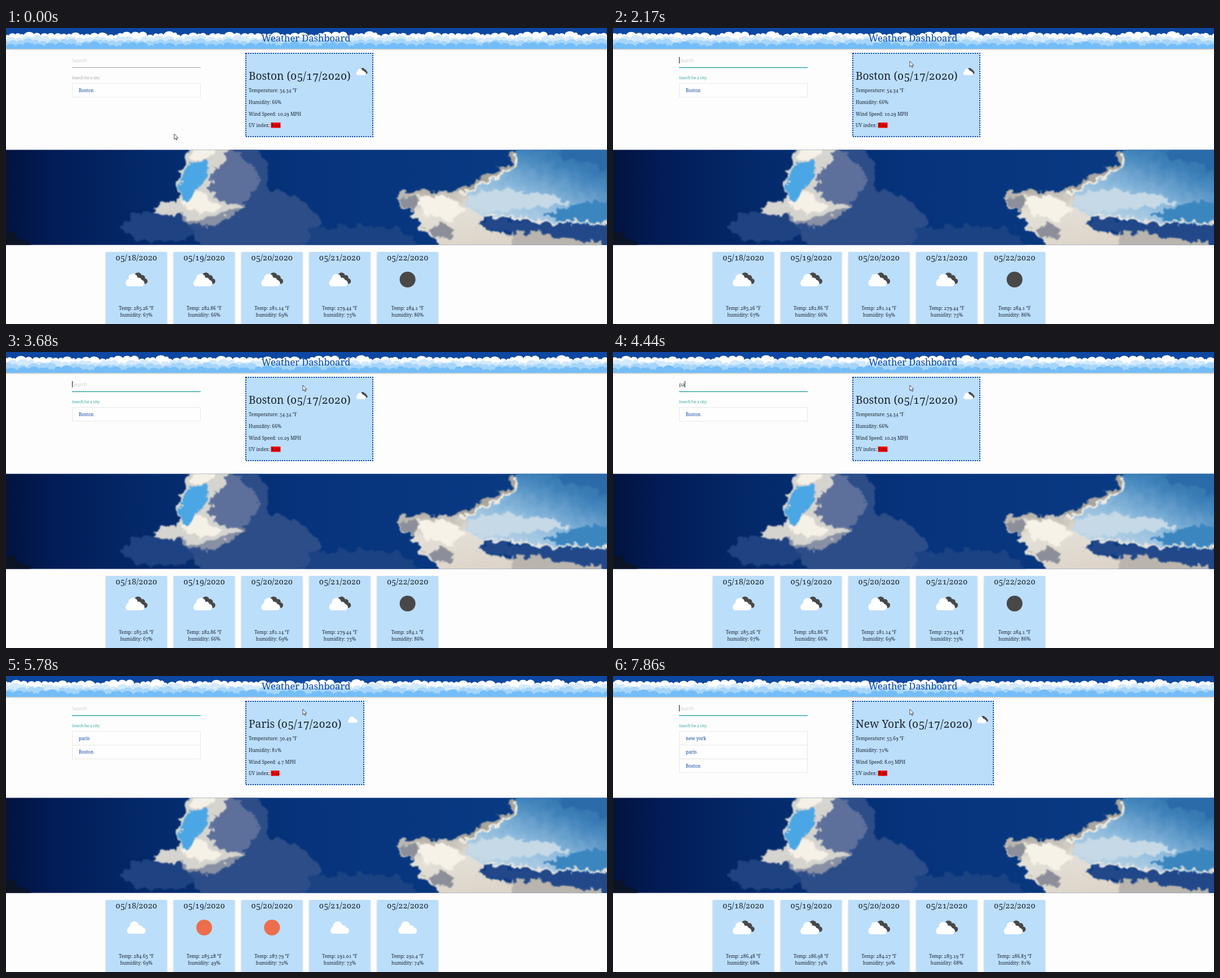
Write an HTML page that moves like this. It is 1065 px wide and 526 px high and loops after 7.99 s.

```html
<!DOCTYPE html>
<html lang="en">
<head>
<meta charset="utf-8">
<title>Weather Dashboard</title>
<style>
  html, body { margin: 0; width: 100%; height: 100%; overflow: hidden; background: #fdfdfd; }
  svg { display: block; width: 100%; height: 100%; }
  text { font-family: "Noto Serif", serif; font-variant-numeric: oldstyle-nums tabular-nums; fill: #1c2530; white-space: pre; }
  .sans { font-family: "Open Sans", sans-serif; font-variant-numeric: normal; }
  .mid { text-anchor: middle; }
  .blue { fill: #0d47a1; }
</style>
</head>
<body>
<svg viewBox="0 0 1065 526">
  <defs>
    <clipPath id="headerClip"><rect width="1065" height="37"/></clipPath>
    <clipPath id="skyClip"><rect y="216.5" width="1065" height="169"/></clipPath>
    <linearGradient id="night">
      <stop offset="0" stop-color="#02133f"/>
      <stop offset=".08" stop-color="#021c56"/>
      <stop offset=".25" stop-color="#042a6c"/>
      <stop offset=".5" stop-color="#06337c"/>
      <stop offset="1" stop-color="#0a3d85"/>
    </linearGradient>
    <linearGradient id="day" x1=".2" y1="1" x2="1" y2="0">
      <stop offset="0" stop-color="#c3d9e9"/>
      <stop offset=".35" stop-color="#8bb9dc"/>
      <stop offset=".65" stop-color="#3f82ba"/>
      <stop offset="1" stop-color="#1d5b97"/>
    </linearGradient>
    <linearGradient id="cream" x1="0" y1="0" x2=".3" y2="1">
      <stop offset="0" stop-color="#aaa69f"/>
      <stop offset=".4" stop-color="#e4e0d8"/>
      <stop offset="1" stop-color="#ddd4c8"/>
    </linearGradient>
    <filter id="ragged" filterUnits="userSpaceOnUse" x="-20" y="196" width="1105" height="210" color-interpolation-filters="sRGB">
      <feTurbulence type="fractalNoise" baseFrequency=".06" numOctaves="4" seed="8"/>
      <feDisplacementMap in="SourceGraphic" scale="24" xChannelSelector="R" yChannelSelector="G"/>
      <feGaussianBlur stdDeviation=".9"/>
    </filter>
    <filter id="shadow" x="-10%" y="-10%" width="120%" height="120%">
      <feDropShadow dx="0" dy="1" stdDeviation="1" flood-opacity=".3"/>
    </filter>
    <g id="cloud" fill="#fff">
      <rect x="-16.5" y="0" width="33" height="11" rx="5.5"/>
      <circle cx="-3.5" cy="-3" r="8"/>
      <circle cx="6.5" cy="1" r="5"/>
      <circle cx="-9.5" cy="3.5" r="6"/>
    </g>
    <g id="broken">
      <g fill="#484848">
        <circle cx="3" cy="-6.3" r="6.3"/>
        <circle cx="10.5" cy="-3" r="5"/>
        <circle cx="15" cy="3" r="4.8"/>
        <rect x="2" y="-4" width="12" height="11.5"/>
      </g>
      <use href="#cloud" x="-2.5" y="1" stroke="#bbdefb" stroke-width="1"/>
      <use href="#cloud" x="-2.5" y="1"/>
    </g>
    <circle id="sun" r="14" fill="#ec6e4c"/>
    <circle id="moon" r="14" fill="#484848"/>
  </defs>

  <rect width="1065" height="526" fill="#fdfdfd"/>
  <rect width="1065" height="37" fill="#0d47a1" filter="url(#shadow)"/>
  <g id="clouds" clip-path="url(#headerClip)"></g>
  <text class="mid blue" x="531.5" y="24" font-size="16.5">Weather Dashboard</text>

  <g clip-path="url(#skyClip)">
    <rect y="216" width="1065" height="170" fill="url(#night)"/>
    <g filter="url(#ragged)">
      <path fill="#0b1424" d="M-20 350L25 368 50 400H-20Z"/>
      <path fill="#1f4282" d="M205 355L225 330 300 322 340 360 320 378 235 378Z"/>
      <path fill="#2c4d88" d="M345 205H440L462 250 465 285 515 300 548 322 558 352 535 385 480 400H350L325 350Z"/>
      <path fill="#1b4283" d="M540 360L600 350 700 357 745 400H520Z"/>
      <path fill="#5d709b" d="M385 205L425 230 450 262 442 292 415 315 375 308 345 290 358 255Z"/>
      <path fill="#8790a4" d="M300 325L425 312 412 331 388 336 372 350 355 354 335 346 312 338Z"/>
      <path fill="#d6d4cf" d="M322 208H395L388 236 370 250 358 278 370 302 398 311 425 320 390 330 345 342 312 333 290 333 262 322 278 312 304 308 305 270 316 245Z"/>
      <path fill="#f5f1e6" d="M331 215H376L364 228 330 238Z M308 306L345 288 364 308 385 318 350 328 325 326Z"/>
      <path fill="#4aa6e4" d="M328 240L354 234 360 262 344 282 321 304 308 302 310 268Z"/>
      <path fill="url(#day)" d="M907 205H1090V348H960L905 337H825L805 305 835 280 890 255 908 224Z"/>
      <path fill="#2c6baa" d="M990 205H1090V262L1045 246 985 230Z"/>
      <path fill="#c5d9e6" d="M820 300L870 288 960 296 1000 310 930 322 850 328 815 316Z"/>
      <path fill="#3c86c0" d="M955 330L1010 314 1090 300V347H990Z"/>
      <path fill="url(#cream)" d="M810 288L768 292 740 284 715 291 685 300 700 319 722 326 716 337 736 346 735 363 760 371 775 400H950L880 364 835 352 850 335 812 318 820 300Z"/>
      <path fill="#8c8f99" d="M690 303L716 298 735 306 722 324 702 318Z M742 355L775 348 790 368 770 376Z"/>
      <path fill="#f6f2e8" d="M728 300L762 296 800 306 812 326 790 340 750 336 736 322Z"/>
      <path fill="none" stroke="#a8a59f" stroke-width="10" d="M906 220L896 244 870 258 836 274 805 292"/>
      <path fill="none" stroke="#f0ece2" stroke-width="5" d="M909 222L899 247 872 262 838 279 808 298"/>
      <path fill="#22488a" d="M835 350L860 337 905 342 960 349 1090 349V400H950L890 364Z"/>
      <path fill="none" stroke="#e8e6df" stroke-width="4" d="M845 335L905 335 960 347 1020 343 1080 348"/>
      <path fill="#b9b5ae" d="M890 368L940 362 985 376 1060 381V400H900Z"/>
    </g>
  </g>

  <g id="content"></g>
  <rect id="caret" y="51.5" width="1" height="11.5" fill="#222"/>
  <path id="pointer" d="M0 0V9.8L2.3 7.8 3.8 11.2 5.4 10.5 3.9 7.2H6.9Z" fill="#fff" stroke="#222" stroke-width=".8"/>
</svg>
<script>
const LOOP = 7990, BLINK = 530;
const $ = id => document.getElementById(id);

const cities = {
  boston: { title: 'Boston', right: 651, icon: 'broken', temp: '54.34', humidity: 66, wind: '10.29', uv: '8.82', uvWidth: 17,
    days: [['broken', '285.26', 67], ['broken', '282.86', 66], ['broken', '281.14', 69], ['broken', '279.44', 75], ['moon', '284.1', 86]] },
  paris: { title: 'Paris', right: 635, icon: 'cloud', temp: '50.49', humidity: 81, wind: '4.7', uv: '7.16', uvWidth: 14.5,
    days: [['cloud', '284.65', 69], ['sun', '285.28', 49], ['sun', '287.79', 72], ['cloud', '291.01', 73], ['cloud', '292.4', 74]] },
  newYork: { title: 'New York', right: 675, icon: 'broken', temp: '55.69', humidity: 71, wind: '8.05', uv: '8.96', uvWidth: 16.5,
    days: [['broken', '286.48', 68], ['broken', '286.98', 74], ['broken', '284.27', 50], ['broken', '283.19', 68], ['broken', '286.85', 81]] }
};
const recent = ['HOLLERAN MULCHES', 'refund', 'silver dragons online', 'front end', 'Wollastonite', 'SPHAGNUM PEAT MOSS'];
const matches = ['beagle', 'beagle puppies', 'business cards'];

// Each step overrides parts of the one before it.
const steps = [];
const step = (at, change) => steps.push({ ...steps.at(-1), at, menu: [], ...change });
const type = (prefix, letters, start, gap) =>
  [...letters].forEach((_, i) => step(start + i * gap, { input: prefix + letters.slice(0, i + 1) }));

step(0, { input: '', focused: false, city: cities.boston, history: ['Boston'] });
step(900, { focused: true, menu: recent });
step(2000, {});
step(2400, { input: 'b', menu: matches });
step(3450, { input: '' });
type('', 'pa', 4050, 250);
type('pa', 'ris', 4500, 150);
step(5150, { input: '', city: cities.paris, history: ['paris', 'Boston'] });
type('', 'new ', 6250, 150);
type('new ', 'york', 6900, 140);
step(7500, { input: '', city: cities.newYork, history: ['new york', 'paris', 'Boston'] });

const text = (x, y, size, value, attrs = '') => `<text x="${x}" y="${y}" font-size="${size}" ${attrs}>${value}</text>`;
const rect = (x, y, w, h, attrs) => `<rect x="${x}" y="${y}" width="${w}" height="${h}" ${attrs}/>`;
const icon = (name, x, y, scale = 1) => `<use href="#${name}" transform="translate(${x} ${y}) scale(${scale})"/>`;

function searchPanel({ input, focused, history, menu }) {
  const accent = focused ? '#26a69a' : '#9e9e9e';
  let out = text(117, 61, 8.5, input || 'Search', `id="field" class="sans" style="fill:${input ? '#333' : '#cfcfcf'}"`)
    + rect(117, 69.7, 228, focused ? 1.4 : 1, `fill="${accent}"`)
    + text(117, 90.5, 6.25, 'Search for a city:', `style="fill:${accent}"`);
  history.forEach((name, i) => {
    const y = 98.5 + i * 24.4;
    out += rect(117.5, y, 227, 24.4, 'fill="#fefefe" stroke="#e8e8e8"') + text(129, y + 15.5, 8, name, 'class="blue"');
  });
  if (menu.length) {
    out += rect(117, 71, 228, menu.length * 20.3 + 9, 'fill="#fff" filter="url(#shadow)"');
    menu.forEach((item, i) => out += text(124, 88.5 + i * 20.3, 7, item, 'class="sans" font-weight="500"'));
  }
  return out;
}

function cityCard({ title, right, icon: name, temp, humidity, wind, uv, uvWidth }) {
  const line = (y, value) => text(430, y, 8.15, value);
  return rect(424, 44, right - 424, 150, 'fill="#bbdefb"')
    + rect(425, 45, right - 426, 148, 'fill="none" stroke="#0d47a1" stroke-width="2" stroke-dasharray="2 2"')
    + text(430, 92, 19.2, `${title} (05/17/2020)`)
    + icon(name, right - 20.5, 77.5, .51)
    + line(113.5, `Temperature: ${temp} °F`)
    + line(134.5, `Humidity: ${humidity}%`)
    + line(155.5, `Wind Speed: ${wind} MPH`)
    + line(176, 'UV index:')
    + rect(469.5, 168, uvWidth, 9.5, 'fill="#f00"')
    + text(470, 176, 8.15, uv, 'style="fill:#4a0d0d"');
}

function forecast(days) {
  return days.map(([name, temp, humidity], i) => {
    const left = 177 + i * 120.15, mid = left + 54;
    return rect(left, 398, 108, 140, 'rx="1" fill="#bbdefb" filter="url(#shadow)"')
      + text(mid, 413, 14.1, `05/${18 + i}/2020`, 'class="mid"')
      + icon(name, mid, 447)
      + text(mid, 500.5, 8.2, `Temp: ${temp} °F`, 'class="mid"')
      + text(mid, 513, 8.2, `humidity: ${humidity}%`, 'class="mid"');
  }).join('');
}

let seed = 11;
const random = () => (seed = seed * 16807 % 2147483647) / 2147483647;

// A repeating skyline of arcs; every arc ends at the height where the next begins.
const PERIOD = 355;
function cloudBank(top, bumps, color) {
  const widths = Array.from({ length: bumps }, () => .3 + random());
  const total = widths.reduce((a, b) => a + b);
  const heights = widths.map((_, i) => top + 1.5 * Math.sin(i * 6 * Math.PI * 2 / bumps) + random() * 4);
  const arcs = widths.map((w, i) => {
    const dx = w / total * PERIOD, dy = heights[(i + 1) % bumps] - heights[i];
    return `a${dx * .56} ${dx * .45} 0 0 1 ${dx} ${dy}`;
  }).join('');
  return `<path fill="${color}" d="M0 ${heights[0]}${arcs.repeat(4)}V40H0Z"/>`;
}
const banks = [
  { top: 10, bumps: 32, color: '#fff', speed: 4 },
  { top: 17, bumps: 29, color: '#d3eafc', speed: 7 },
  { top: 23, bumps: 27, color: '#a6d5fa', speed: 10 },
  { top: 29, bumps: 26, color: '#74bdf8', speed: 13 }
];
$('clouds').innerHTML = banks.map(b => cloudBank(b.top, b.bumps, b.color)).join('');
const bankPaths = [...$('clouds').children];

const route = [[120, 298, 188], [800, 232, 59], [930, 232, 59], [1300, 526, 59]];
function pointerAt(t) {
  const next = route.findIndex(p => p[0] > t);
  if (next === 0) return route[0].slice(1);
  if (next < 0) return route.at(-1).slice(1);
  const [t0, x0, y0] = route[next - 1], [t1, x1, y1] = route[next];
  const u = (t - t0) / (t1 - t0), ease = u * u * (3 - 2 * u);
  return [x0 + (x1 - x0) * ease, y0 + (y1 - y0) * ease];
}

let shown;
function draw(now) {
  const t = now % LOOP;
  const state = steps.findLast(s => s.at <= t);
  if (state !== shown) {
    shown = state;
    $('content').innerHTML = searchPanel(state) + cityCard(state.city) + forecast(state.city.days);
    $('caret').setAttribute('x', 117 + (state.input ? $('field').getComputedTextLength() : 0));
  }
  const caretOn = state.focused && (t - state.at) % (2 * BLINK) < BLINK;
  $('caret').setAttribute('visibility', caretOn ? 'visible' : 'hidden');
  $('pointer').setAttribute('transform', `translate(${pointerAt(t)})`);
  bankPaths.forEach((path, i) => path.setAttribute('transform', `translate(${-banks[i].speed * t / 1000})`));
  requestAnimationFrame(draw);
}
draw(0);
</script>
</body>
</html>
```
